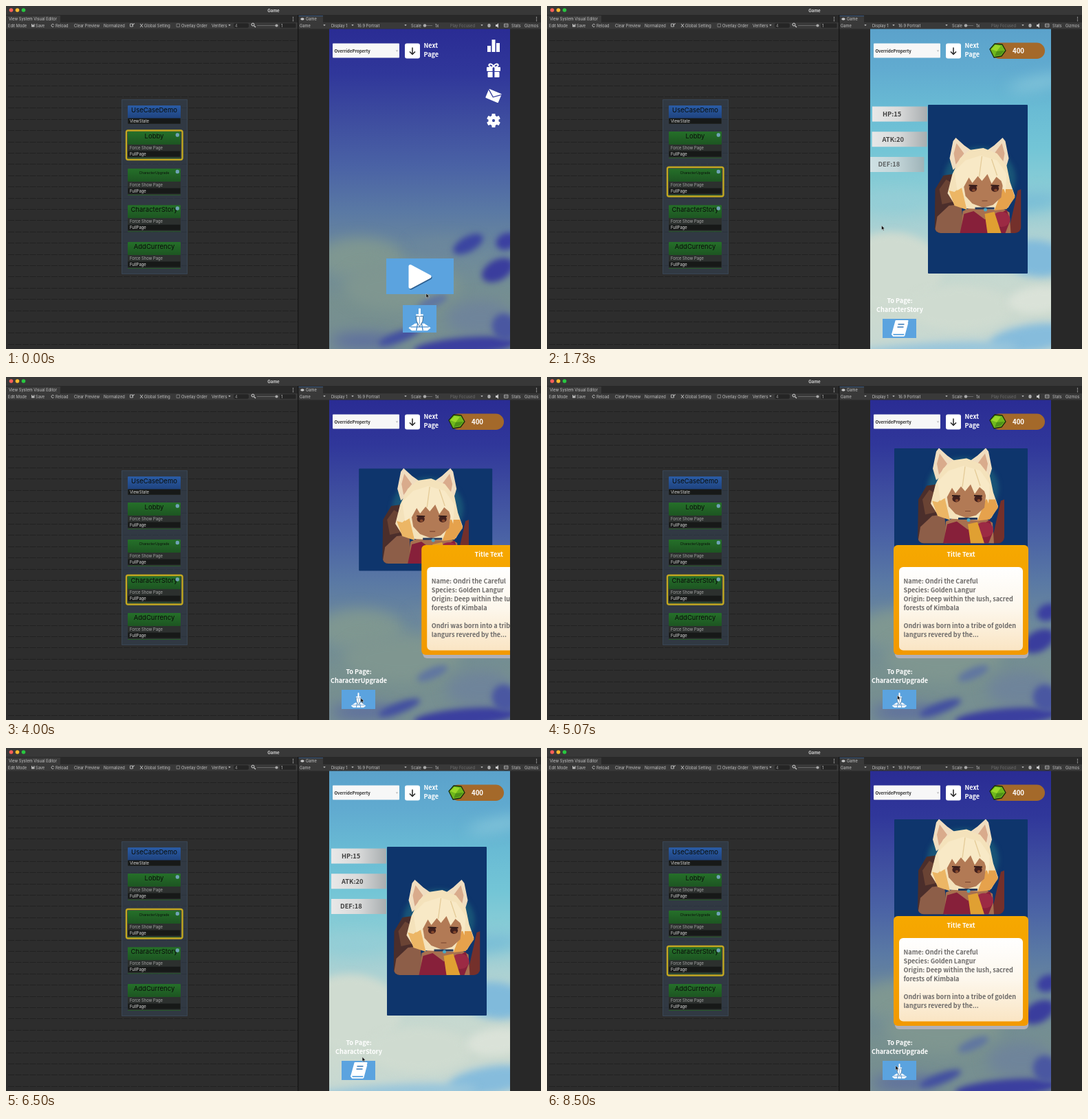
Recreate the animation shown at these times as an HTML page with a canvas. Size 778 px wide and 500 px high, loop 8.58 s.

```html
<!DOCTYPE html>
<html lang="en">
<head>
<meta charset="utf-8">
<title>View System demo</title>
<style>
html, body { margin: 0; width: 100%; height: 100%; overflow: hidden; background: #282828; }
canvas { display: block; }
</style>
</head>
<body>
<canvas id="stage" width="778" height="500"></canvas>
<script>
const LOOP = 8580;
const UI = 'Inter, "Liberation Sans", sans-serif';
const GAME = '"Noto Sans CJK JP", "Noto Sans CJK SC", "Noto Sans CJK", "Noto Sans", sans-serif';
const stage = document.getElementById('stage').getContext('2d');
let c = stage;

// ---------- helpers ----------
const clamp = v => Math.max(0, Math.min(1, v));
const mix = (a, b, p) => a + (b - a) * p;
const outQuad = u => 1 - (1 - clamp(u)) ** 2;

function box(x, y, w, h, fill, r = 0) {
  c.fillStyle = fill;
  c.beginPath();
  c.roundRect(x, y, w, h, r);
  c.fill();
}
function frame(x, y, w, h, color, width, r = 0) {
  c.strokeStyle = color;
  c.lineWidth = width;
  c.beginPath();
  c.roundRect(x, y, w, h, r);
  c.stroke();
}
function poly(points, fill, stroke, width = 1) {
  c.beginPath();
  for (let i = 0; i < points.length; i += 2) c.lineTo(points[i], points[i + 1]);
  c.closePath();
  if (fill) { c.fillStyle = fill; c.fill(); }
  if (stroke) { c.strokeStyle = stroke; c.lineWidth = width; c.lineJoin = 'round'; c.stroke(); }
}
function oval(x, y, rx, ry, fill, turn = 0) {
  c.fillStyle = fill;
  c.beginPath();
  c.ellipse(x, y, rx, ry, turn, 0, 7);
  c.fill();
}
function line(x1, y1, x2, y2, color, width = 1) {
  c.strokeStyle = color;
  c.lineWidth = width;
  c.beginPath();
  c.moveTo(x1, y1);
  c.lineTo(x2, y2);
  c.stroke();
}
function text(s, x, y, size, color, align = 'left', font = UI, weight = 400) {
  c.font = `${weight} ${size}px ${font}`;
  c.fillStyle = color;
  c.textAlign = align;
  c.textBaseline = 'alphabetic';
  c.fillText(s, x, y + size * 0.36);
}
const bold = (s, x, y, color, align, size = 9.1) => text(s, x, y, size, color, align, GAME, 700);
function fade(x1, y1, x2, y2, ...colors) {
  const g = c.createLinearGradient(x1, y1, x2, y2);
  colors.forEach((k, i) => g.addColorStop(i / (colors.length - 1), k));
  return g;
}
function at(x, y, draw, scale = 1, alpha = 1, turn = 0) {
  c.save();
  c.translate(x, y);
  c.rotate(turn);
  c.scale(scale, scale);
  c.globalAlpha *= alpha;
  draw();
  c.restore();
}
function prerender(draw) {
  const layer = document.createElement('canvas');
  layer.width = 778;
  layer.height = 500;
  c = layer.getContext('2d');
  draw();
  c = stage;
  return layer;
}

// ---------- editor window ----------
const arrow = (x, y = 28) => poly([x - 1.7, y - 1, x + 1.7, y - 1, x, y + 1.3], '#b8b8b8');
const label = (s, x, color = '#c2c2c2') => text(s, x, 28.5, 5.7, color);

function drawNode(title, y, isPage, size = 9.5) {
  box(177, y, 77, isPage ? 38 : 27, '#2c302e', 1);
  box(177, y, 77, 19, isPage ? fade(0, y, 0, y + 19, '#257029', '#1d5522') : fade(0, y, 0, y + 19, '#2a5ca6', '#1f437e'), 1);
  text(title, 215.5, y + 6.5, size, '#0a0d0a', 'center');
  const field = y + (isPage ? 28.5 : 18.5);
  if (isPage) text('Force Show Page', 180, y + 24, 5.8, '#a9a9a9');
  box(177.5, field, 76, 8, '#171918');
  text(isPage ? 'FullPage' : 'ViewState', 180, field + 4, 5.9, '#dcdcdc');
  if (isPage) line(177, y + 38.5, 254, y + 38.5, '#285c2b');
}

const editor = prerender(() => {
  box(0, 0, 778, 500, '#282828');
  box(0, 0, 778, 13, '#383838');
  ['#ff5f57', '#febc2e', '#28c840'].forEach((k, i) => oval(7.5 + i * 9, 6, 2.8, 2.8, k));
  text('Game', 389, 6.5, 6.2, '#cfcfcf', 'center', UI, 700);

  // graph area
  box(0, 33, 424, 467, '#2d2d2d');
  c.setLineDash([9, 1.5]);
  for (let y = 50; y < 500; y += 16.4) line(3, Math.round(y) + .5, 424, Math.round(y) + .5, '#212121');
  c.setLineDash([]);

  // tabs and toolbars
  box(0, 14, 424, 10, '#292929');
  box(0, 14, 79, 10, '#3a3a3a');
  text('View System Visual Editor', 4, 19, 5.7, '#c8c8c8');
  box(0, 24, 424, 9.5, '#393939');
  box(425, 14, 353, 10, '#292929');
  box(425, 14, 36, 10, '#3a3a3a');
  box(425, 14, 36, 1, '#35557c');
  oval(431, 19, 2.7, 1.7, '#c8c8c8');
  text('Game', 436, 19, 5.7, '#c8c8c8');
  box(425, 24, 353, 9.5, '#393939');
  box(424, 13, 1.4, 487, '#171717');
  for (const x of [417.5, 771.5]) for (const y of [16.5, 19, 21.5]) oval(x, y, .7, .7, '#c0c0c0');
  box(331, 25.3, 22, 6.5, '#252525', 2);
  box(398.5, 25.3, 23, 6.5, '#252525', 1);

  const items = [['Edit Mode', 3], ['Save', 43], ['Reload', 72], ['Clear Preview', 99], ['Normalized', 142],
    ['Global Setting', 201], ['Overlay Order', 255], ['Verifiers', 299], ['1', 400], ['Game', 427],
    ['Display 1', 473], ['16:9 Portrait', 511], ['Scale', 589], ['1x', 624], ['Stats', 735], ['Gizmos', 754]];
  for (const [s, x] of items) label(s, x);
  label('Play Focused', 646, '#6f6f6f');
  label('4', 333, '#999');
  [325, 463, 504, 581, 692].forEach(x => arrow(x));

  box(37, 26, 4.5, 4.5, '#bbb');
  box(38, 26, 2.5, 1.6, '#444');
  c.strokeStyle = '#bbb';
  c.lineWidth = 1;
  c.beginPath();
  c.arc(68, 28.4, 2, .6, 5.8);
  c.stroke();
  frame(180.5, 26, 4, 4, '#bbb', .9);
  line(183, 28, 187, 25.5, '#bbb');
  line(195, 26, 199, 31, '#bbb');
  line(199, 26, 195, 31, '#bbb');
  frame(248, 26, 4.5, 4.5, '#888', .8);
  frame(357, 25, 4, 4, '#d0d0d0', 1, 2);
  line(360.6, 28.6, 363, 31, '#d0d0d0', 1.2);
  line(365, 28.5, 395, 28.5, '#686868');
  oval(393.5, 28.5, 2.1, 2.1, '#aaa');
  line(607, 28.5, 620, 28.5, '#686868');
  oval(609, 28.5, 2.3, 2.3, '#aaa');
  oval(702.5, 28.5, 2.2, 2.7, '#aaa');
  poly([712, 27, 714, 27, 716, 25, 716, 32, 714, 30, 712, 30], '#ccc');
  frame(724.5, 26, 5.5, 4.5, '#aaa', .9);
  line(725, 28, 730, 28, '#aaa', .8);

  // nodes
  box(168, 136, 96, 255, 'rgba(55,70,90,.5)');
  frame(168.5, 136.5, 95, 254, '#394553', 1);
  drawNode('UseCaseDemo', 145, false);
  drawNode('Lobby', 183, true);
  drawNode('CharacterUpgrade', 237, true, 5);
  drawNode('CharacterStory', 290.3, true);
  drawNode('AddCurrency', 344, true);
  [188, 241.5, 295].forEach(y => box(246.7, y - 2.7, 5.2, 5.4, '#6fa3b5', 2));
});

// ---------- game backdrops ----------
function blobs(list, blur) {
  c.filter = `blur(${blur}px)`;
  for (const [x, y, rx, ry, color, turn = 0] of list) oval(x, y, rx, ry, color, turn);
  c.filter = 'none';
}
const dusk = prerender(() => {
  box(470, 33, 263, 467, fade(0, 33, 0, 500, '#2a2c94', '#30379a', '#3e4d9f', '#4a62a5', '#5a79a4', '#6f8b9b', '#77908f', '#768e92'));
  blobs([
    [515, 368, 62, 30, '#7f9791'], [575, 410, 85, 35, '#7f9690'], [640, 350, 50, 12, '#6c879c'],
    [520, 488, 48, 10, '#5a6aa0'], [690, 455, 50, 28, '#6f849a']
  ], 10);
  blobs([
    [672, 347, 24, 11, '#3b45a1', -.5], [728, 343, 16, 12, '#3b3fa0', -.4], [715, 385, 25, 15, '#3a3d9d', -.5],
    [620, 432, 24, 8, '#6076a0', -.4], [572, 482, 32, 8, '#4350a0', -.35], [668, 496, 75, 13, '#3b3f9f', -.08],
    [725, 468, 18, 20, '#4a57a1', -.4]
  ], 4);
});
const beach = prerender(() => {
  box(470, 33, 263, 467, fade(0, 33, 0, 500, '#5ba2cb', '#61abd0', '#69bbd4', '#73c5d6', '#8bcdd6', '#aad1d3', '#c4d8d0', '#cddacf', '#c6d8d2'));
  blobs([
    [715, 112, 45, 8, '#86c6da', -.2], [505, 285, 45, 13, '#93cdd6'], [700, 285, 50, 14, '#79bdd6', -.1]
  ], 10);
  blobs([
    [500, 385, 75, 55, '#cfdbd0'], [600, 440, 75, 32, '#cfdbd0'], [712, 368, 48, 27, '#80badb', .1],
    [715, 428, 45, 19, '#dae2d8', -.1], [705, 484, 62, 20, '#86bcdc', -.15], [560, 503, 125, 12, '#98c5db', -.06]
  ], 6);
});

// ---------- icons ----------
function swordIcon() {
  poly([-17, 13, -7, 6, 7, 6, 17, 13, 12, 17, -12, 17], '#fff');
  for (const x of [-5, 5]) line(x * .6, 6, x, 17, '#438acb', 1.4);
  line(-14, 11.5, 14, 11.5, '#438acb', 1.2);
  poly([-5.5, -5, 5.5, -5, 4.5, 3, 0, 11, -4.5, 3], '#fff', '#24527c', .8);
  line(0, -4, 0, 7, '#6aa6d6', 1);
  box(-1.6, -17, 3.2, 12, '#fff', 1);
  line(-5.5, -7, 5.5, -7, '#fff', 2.4);
}
function bookIcon() {
  poly([-5, -11, 12, -11, 7, 7, -10, 7], '#fff', '#fff', 2);
  line(-11, 7.5, -9, 10.8, '#fff', 2);
  line(-9.5, 10.8, 7, 10.8, '#fff', 2);
  line(7, 10.8, 12, -8, '#fff', 1.5);
  line(-2, -6, 7, -6, '#3779b7', 1.7);
  line(-3, -2, 6, -2, '#3779b7', 1.7);
}
function gearIcon() {
  for (let i = 0; i < 6; i++) {
    box(-2.6, -10, 5.2, 8, '#fff', 1);
    c.rotate(Math.PI / 3);
  }
  c.strokeStyle = '#fff';
  c.lineWidth = 4.2;
  c.beginPath();
  c.arc(0, 0, 5.5, 0, 7);
  c.stroke();
}
function giftIcon() {
  box(-10, -5, 20, 6, '#fff', 1);
  box(-8.5, 2, 17, 8, '#fff', 1);
  box(-1.4, -5, 2.8, 15, '#3039a0');
  c.strokeStyle = '#fff';
  c.lineWidth = 2;
  for (const s of [-1, 1]) {
    c.beginPath();
    c.ellipse(s * 3.6, -7.2, 3.2, 2, s * -.5, 0, 7);
    c.stroke();
  }
}
function mailIcon() {
  box(-10, -7, 20, 14, '#fff', 1);
  c.strokeStyle = '#333c9c';
  c.lineWidth = 1.3;
  c.beginPath();
  c.moveTo(-10, -6);
  c.lineTo(0, 2);
  c.lineTo(10, -6);
  c.stroke();
}
const button = (x, y, w, h, pressed) => box(x, y, w, h, pressed ? '#427fb8' : '#5ba3df');

// ---------- character card, centred on its own origin ----------
function portrait() {
  c.save();
  c.beginPath();
  c.roundRect(-63, -75, 126, 139, [0, 0, 9, 9]);
  c.clip();
  c.filter = 'blur(3px)';
  oval(3, -16, 52, 45, '#185477');
  c.filter = 'none';

  // pack, staff, arm and dress
  poly([-62, 0, -50, -20, -36, -22, -24, 6, -26, 64, -63, 64], '#4b2e2b');
  poly([-56, 0, -46, -14, -36, -8, -34, 18, -52, 22], '#6a4334');
  poly([44, 64, 58, 2, 63, 0, 63, 64], '#74302b');
  poly([-63, 64, -59, 40, -42, 24, -24, 22, -20, 64], '#8d5e48');
  poly([-24, 64, -22, 32, 0, 22, 26, 22, 46, 34, 48, 64], '#a8704f');
  poly([-26, 64, -20, 36, -6, 32, 10, 44, 24, 40, 42, 30, 47, 46, 40, 64], '#87203a');
  oval(34, 44, 13, 11, '#9c2a44');
  poly([10, 36, 24, 33, 34, 64, 14, 64], '#e0a032');

  for (const s of [-1, 1]) {
    at(2, 0, () => {
      c.scale(s, 1);
      poly([8, -54, 22, -64, 34, -75, 38, -70, 43, -45, 38, -28], '#f0ddc0');
      poly([22, -52, 33, -67, 37, -52, 34, -36], '#d9ab8c');
    });
  }

  // hair, face and fringe
  poly([-26, -45, -12, -57, 8, -60, 28, -52, 42, -34, 47, -10, 54, 10, 44, 27, 24, 30, -18, 28, -34, 22, -44, 6, -37, -22], '#f4e2bb');
  poly([-42, 2, -34, 4, -24, -4, -16, 30, -34, 24], '#ecb665');
  poly([36, 0, 50, 0, 54, 12, 42, 29, 24, 31], '#e6a24c');
  poly([-22, -14, -10, -26, 26, -26, 37, -12, 34, 12, 22, 23, 8, 27, -8, 21, -18, 10], '#b27a55');
  poly([-30, 2, -34, -26, -18, -42, 4, -49, 28, -42, 42, -22, 40, 6, 34, -12, 27, -18, 20, -8, 14, -22, 6, -12, 0, -19, -8, -9, -13, -17, -20, -4], '#f8e9c6');
  line(6, -48, 2, -18, '#e4cb98', 1.3);
  line(20, -44, 28, -20, '#e4cb98', 1.3);
  for (const x of [-7, 25]) {
    oval(x, -1, 5.6, 5, '#42201d');
    oval(x + 1, 1.5, 2.4, 2, '#85482c');
    line(x - 6, -5.5, x + 6, -5, '#321b19', 1.8);
  }
  line(6, 17, 14, 17, '#79432f', 1.2);
  line(-4, 28, 24, 28, '#263a5b', 3);
  oval(11, 30, 2.5, 2.5, '#4ba6c1');
  c.restore();
}
function card(x, y, w, h) {
  at(x, y, () => {
    box(-w / 2, -h / 2, w, h, '#0e356c', 1);
    portrait();
  });
}

// ---------- pages ----------
function drawLobby(pressed) {
  box(700, 58, 5, 9, '#fff');
  box(706.5, 49, 5, 18, '#fff');
  box(713, 54, 5, 13, '#fff');
  at(709, 94, giftIcon);
  at(709, 131, mailIcon, 1, 1, .4);
  at(709, 167, gearIcon);
  button(553, 368, 98, 52);
  poly([589, 381, 617, 396, 589, 411], '#2d5f90', '#2d5f90', 5);
  poly([588, 379.5, 616, 394.5, 588, 409.5], '#fff', '#fff', 5);
  button(577, 436, 49, 40, pressed);
  at(601.5, 457, swordIcon, .95);
}
function drawUpgrade(age, first, pressed) {
  const p = outQuad(age / 500);
  card(mix(first ? 810 : 602, 626.5, p), mix(first ? 267 : 178, 267, p), 145, 246);
  ['HP:15', 'ATK:20', 'DEF:18'].forEach((s, i) => {
    const u = clamp((age - i * 118) / 560);
    at(-20 * (1 - u), 157.5 + i * 36.7, () => {
      box(473, -11, 80, 22, fade(473, 0, 553, 0, '#e8e8e8', '#d8d9d9', '#a8adaf'));
      bold(s, 488 - (i === 2 ? 2 : 0), 0, '#3f3f3f', 'left', 9.3);
    }, 1, u);
  });
  bold('To Page:', 513, 430, '#fff', 'center');
  bold('CharacterStory', 513, 443, '#fff', 'center');
  button(488, 456, 49, 28, pressed);
  at(512.5, 470, bookIcon);
}
const STORY = ['Name: Ondri the Careful', 'Species: Golden Langur', 'Origin: Deep within the lush, sacred',
  'forests of Kimbala', '', 'Ondri was born into a tribe of golden', 'langurs revered by the...'];
function drawStory(age, pressed) {
  const p = outQuad(age / 500);
  card(mix(626.5, 602, p), mix(267, 178.5, p), 194, 149);
  at(300 * (1 - p), 0, () => {
    box(506, 250, 194, 160, '#b0b0b8', 6);
    box(504, 245, 196, 160, fade(0, 245, 0, 405, '#f6a800', '#f29900'), 6);
    bold('Title Text', 602, 259, '#fff', 'center');
    box(512, 277, 180, 121.5, fade(0, 277, 0, 398, '#ffffff', '#fdf7ec', '#fae5c4'), 6);
    STORY.forEach((s, i) => bold(s, 518.5, 298 + i * 13, '#6c6a69'));
  });
  bold('To Page:', 513, 430, '#fff', 'center');
  bold('CharacterUpgrade', 513, 443, '#fff', 'center');
  button(488, 456, 49, 28, pressed);
  at(512.5, 471, swordIcon, .63);
}
function drawHeader(currency) {
  box(475, 54.5, 97, 21, '#f7f7f7', 1);
  bold('OverrideProperty', 477.5, 65.5, '#2b2b2b', 'left', 6);
  arrow(568.5, 65.5);
  box(580, 54.5, 22, 22, '#fff', 3);
  line(591, 60.5, 591, 70, '#222', 1.5);
  c.beginPath();
  c.moveTo(587, 66.5);
  c.lineTo(591, 70.5);
  c.lineTo(595, 66.5);
  c.stroke();
  bold('Next', 607.5, 58, '#fff');
  bold('Page', 607.5, 71, '#fff');
  at(0, 0, () => {
    box(646, 53.5, 78, 23.5, '#a4692a', 11.7);
    poly([644, 63, 651, 55, 662, 56, 667, 65, 661, 73, 650, 75], '#6fb81c', '#1a2b0c', 1.3);
    poly([646, 63, 652, 57, 660, 58, 654, 66], '#9ad82a');
    poly([654, 66, 665, 65, 660, 71, 651, 73], '#4f9118');
    bold('400', 685.5, 65.5, '#fff', 'center', 9.7);
  }, 1, currency);
}

// ---------- timeline ----------
const VISITS = [
  { start: 0, page: 'lobby' },
  { start: 1064, page: 'upgrade', first: true },
  { start: 3790, page: 'story' },
  { start: 5494, page: 'upgrade' },
  { start: 7230, page: 'story' }
];
const MARK = { lobby: 181.5, upgrade: 235, story: 289 };
const PATH = [
  [0, 611, 419], [30, 611, 419], [770, 601, 457], [1064, 601, 457], [1700, 486.5, 320], [2030, 486.5, 320],
  [2870, 516, 468], [4300, 516, 468], [5040, 509.5, 464], [5500, 509.5, 464], [5770, 520, 445],
  [6330, 520, 445], [6830, 513, 465], [8030, 513, 465], [8200, 507, 463], [LOOP, 507, 463]
];
function drawCursor(t) {
  const i = PATH.findIndex(k => k[0] > t);
  const [a, b] = [PATH[i - 1], PATH[i]];
  const u = (t - a[0]) / (b[0] - a[0]);
  const p = u * u * (3 - 2 * u);
  at(mix(a[1], b[1], p), mix(a[2], b[2], p), () =>
    poly([0, 0, 0, 6.4, 1.5, 5.1, 2.5, 7.4, 3.5, 6.9, 2.6, 4.7, 4.5, 4.6], '#080808', '#ddd', .5));
}

function draw(t) {
  const visit = VISITS.findLast(v => v.start <= t);
  const next = VISITS[VISITS.indexOf(visit) + 1];
  const pressed = !!next && t > next.start - 100;
  const age = t - visit.start;

  c.drawImage(editor, 0, 0);
  frame(175, MARK[visit.page], 81.5, 42.5, '#c2a820', 2.4, 2.5);

  c.save();
  c.beginPath();
  c.rect(470, 33.5, 263, 467);
  c.clip();
  c.drawImage(visit.page === 'upgrade' ? beach : dusk, 0, 0);
  if (visit.page === 'lobby') drawLobby(pressed);
  else if (visit.page === 'upgrade') drawUpgrade(age, visit.first, pressed);
  else drawStory(age, pressed);
  drawHeader(clamp((t - 1064) / 300));
  c.restore();
  drawCursor(t);
}

const began = performance.now();
function tick() {
  draw((performance.now() - began) % LOOP);
  requestAnimationFrame(tick);
}
tick();
</script>
</body>
</html>
```
